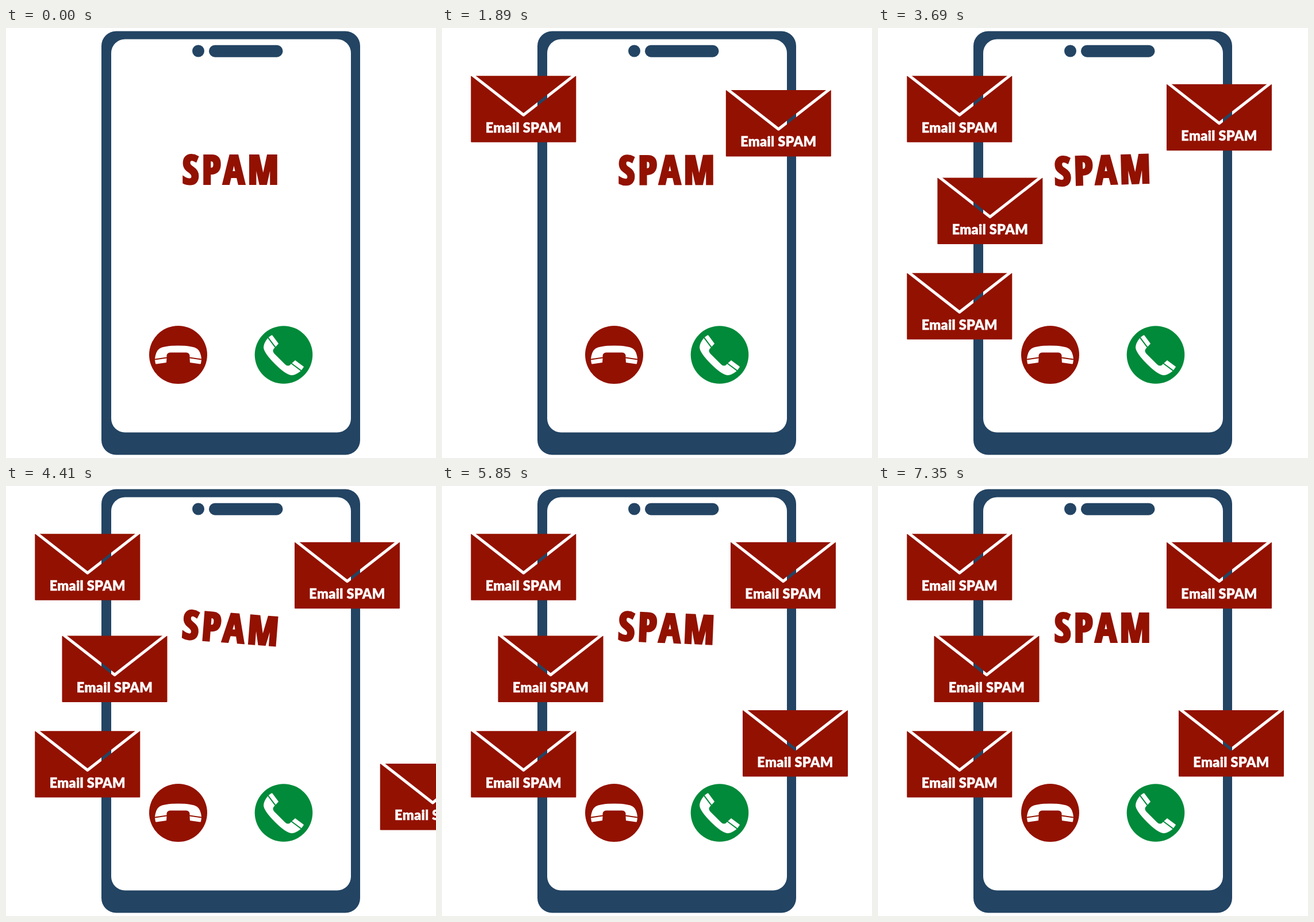
Write an HTML page that moves like this. It is 748 by 748 pixels and loops after 8.07 s.

```html
<!DOCTYPE html>
<html lang="en">
<head>
<meta charset="utf-8">
<title>Spam</title>
<style>
  html, body { margin: 0; width: 100%; height: 100%; overflow: hidden; background: #fff; }
  svg { display: block; width: 100vw; height: 100vh; }
  text { text-anchor: middle; }
  #spam {
    font: 800 68px "Open Sans Condensed", "Open Sans", sans-serif;
    font-stretch: 75%; letter-spacing: 6px;
    fill: #931100; stroke: #931100; stroke-width: 4;
  }
  .label {
    font: 900 23.5px Lato, sans-serif; letter-spacing: .3px;
    fill: #fff; stroke: #fff; stroke-width: .5;
  }
</style>
</head>
<body>
<svg viewBox="0 0 748 748">
  <defs>
    <mask id="fold" maskUnits="userSpaceOnUse" x="-1" y="-1" width="186" height="118">
      <path d="M-1-1h186v118h-186z" fill="#fff"/>
      <path d="M2-2 91.5 68 181-2" fill="none" stroke="#000" stroke-width="5" stroke-linejoin="round"/>
    </mask>
    <g id="mail">
      <rect width="183" height="115.5" rx="1" fill="#931100" mask="url(#fold)"/>
      <text class="label" x="91.5" y="98.5">Email SPAM</text>
    </g>
    <path id="cup" d="M-40.5 9-20 6-20.5 13.5-38 16Q-39.3 16.3-39.5 15Z"/>
    <g id="handset" fill="#fff">
      <path d="M-40.5 7Q-39-6-33-10.5Q-25-16 0-16Q25-16 33-10.5Q39-6 40.5 7L20 4V1Q19-4 13-4H-13Q-19-4-20 1V4Z"/>
      <use href="#cup"/>
      <use href="#cup" transform="scale(-1 1)"/>
    </g>
  </defs>

  <g fill="#234463">
    <rect x="166" y="5.5" width="450" height="737" rx="25.5"/>
    <rect x="183" y="19.5" width="417" height="684" rx="24" fill="#fff"/>
    <circle cx="334.5" cy="40" r="10.5"/>
    <rect x="353" y="29.7" width="128.5" height="21" rx="10.5"/>
  </g>

  <circle cx="299.5" cy="568.5" r="50.5" fill="#931100"/>
  <use href="#handset" transform="translate(299.5 568.5)"/>
  <circle cx="483" cy="568.5" r="50.3" fill="#008a3a"/>
  <use href="#handset" transform="translate(479 573) rotate(-135)"/>

  <text id="spam" x="393.5" y="271.3">SPAM</text>
  <g id="mails"></g>
</svg>
<script>
const LOOP = 8070, STEP = 30;
const FIRST = 639, FLIGHT = 900;
const SHAKE = { start: 378, end: 7338, turns: 23, angle: 5 };
const spam = document.getElementById('spam');
const layer = document.getElementById('mails');

// Resting place and the offset each envelope flies in from, one after another
const mails = [
  { x: 50.3, y: 83.3, dx: -400, dy: -400 },
  { x: 502, y: 97.7, dx: 410, dy: -515 },
  { x: 50.3, y: 426.2, dx: -410, dy: 300 },
  { x: 97.5, y: 260.5, dx: -295, dy: 0 },
  { x: 523, y: 390, dx: 400, dy: 291 }
].map((mail, i) => {
  const node = document.createElementNS('http://www.w3.org/2000/svg', 'use');
  node.setAttribute('href', '#mail');
  layer.append(node);
  return { ...mail, node, start: FIRST + FLIGHT * i };
});

const clamp = v => Math.min(1, Math.max(0, v));

// Share of the way left to go, with a back-out overshoot
const backLeft = p => {
  const u = 1 - p;
  return u * u * (2.70158 * u - 1.70158);
};

function draw(t) {
  const p = clamp((t - SHAKE.start) / (SHAKE.end - SHAKE.start));
  const angle = SHAKE.angle * Math.sin(p * SHAKE.turns * 2 * Math.PI);
  spam.setAttribute('transform', `rotate(${angle.toFixed(3)} 390.5 247)`);

  for (const { node, x, y, dx, dy, start } of mails) {
    const left = backLeft(clamp((t - start) / FLIGHT));
    node.setAttribute('transform', `translate(${x + dx * left} ${y + dy * left})`);
  }
}

const begin = performance.now();
function tick() {
  const t = (performance.now() - begin) % LOOP;
  draw(Math.floor(t / STEP) * STEP);
  requestAnimationFrame(tick);
}
tick();
</script>
</body>
</html>
```
